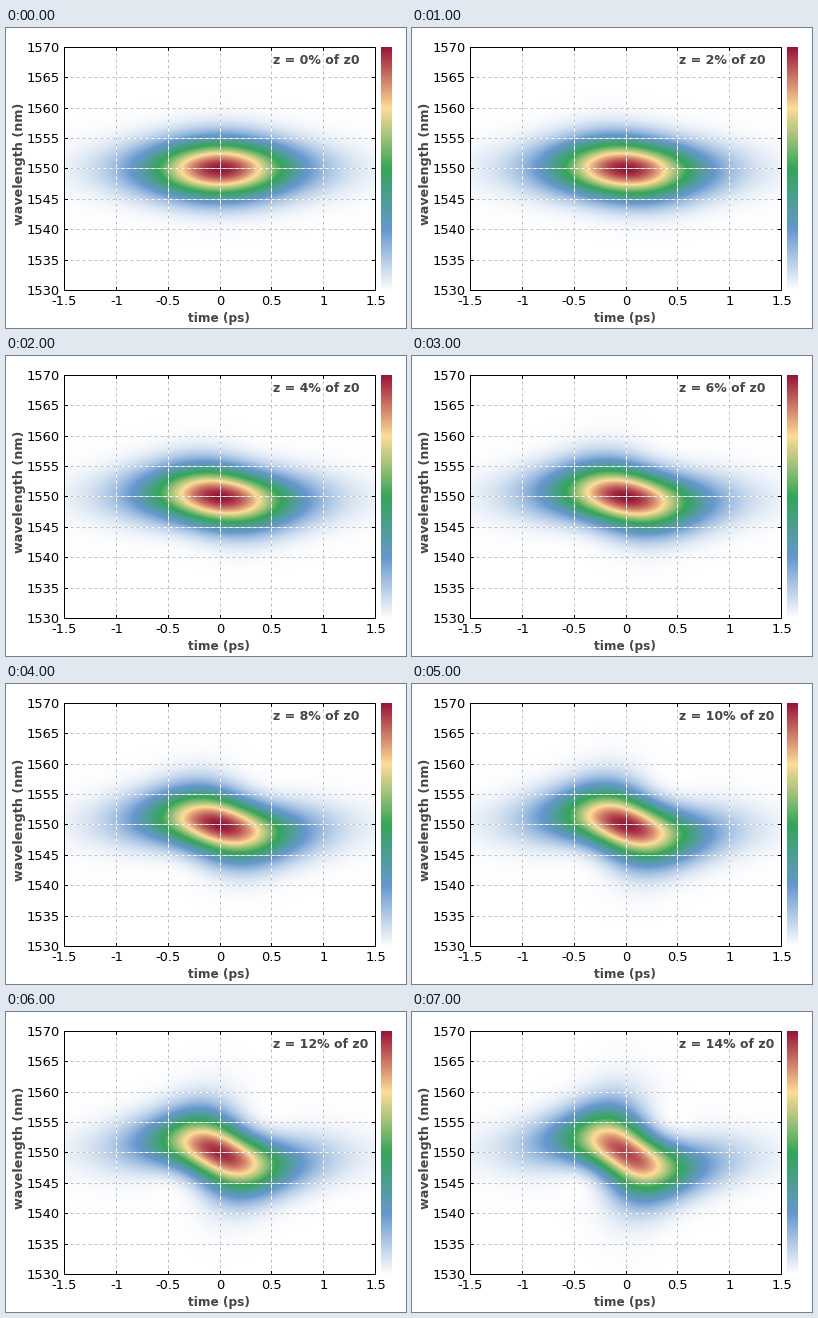
A matplotlib script for the animation above (8000 ms loop, 400 by 300 pixels).

```python
import numpy as np
import matplotlib.pyplot as plt
from matplotlib.animation import FuncAnimation
from matplotlib.colors import LinearSegmentedColormap

DPI = 100
PX = 72 / DPI                              # points per pixel
LEFT, RIGHT, TOP, BOTTOM = 58, 369, 19, 262
FRAMES, INTERVAL = 8, 1000
STEP = 0.02                                # distance per frame, in z0
GREY = "#464646"

ORDER = 3                                  # soliton order
T0 = 1 / 1.763                             # sech width of a 1 ps pulse
GATE = 2 * np.log(2) / 0.5 ** 2            # 0.5 ps Gaussian gate
LIGHT = 299792.458                         # nm THz

plt.rcParams["font.family"] = "DejaVu Sans"

cmap = LinearSegmentedColormap.from_list("spectrum", [
    "white", (0.40, 0.595, 0.81), (0.20, 0.65, 0.34),
    (1.0, 0.865, 0.59), (0.605, 0.08, 0.21)], N=1024)

t = np.linspace(-1.5, 1.5, RIGHT - LEFT + 1)
wavelength = np.linspace(1570, 1530, BOTTOM - TOP + 1)
omega = 2 * np.pi * LIGHT * (1 / wavelength - 1 / 1550)
s = np.linspace(-6, 6, 512, endpoint=False)
gate = np.exp(-GATE * (t[:, None] - s) ** 2)
fourier = np.exp(1j * np.outer(s, omega))
start = 1 / np.cosh(s / T0)
peak = (start * np.exp(-GATE * s ** 2)).sum() ** 2


def propagate(pulse, z, steps=40):
    """Split-step solution of the nonlinear Schroedinger equation."""
    dz = z * np.pi / 2 / steps
    freq = 2 * np.pi * np.fft.fftfreq(s.size, (s[1] - s[0]) / T0)
    dispersion = np.exp(-0.5j * freq ** 2 * dz)
    for _ in range(steps):
        pulse = pulse * np.exp(0.5j * ORDER ** 2 * abs(pulse) ** 2 * dz)
        pulse = np.fft.ifft(np.fft.fft(pulse) * dispersion)
        pulse = pulse * np.exp(0.5j * ORDER ** 2 * abs(pulse) ** 2 * dz)
    return pulse


def spectrogram(z):
    pulse = propagate(start, z)
    return (np.abs((gate * pulse) @ fourier) ** 2).T / peak


fig = plt.figure(figsize=(400 / DPI, 300 / DPI), dpi=DPI, facecolor="white")
ax = fig.add_axes([0, 0, 1, 1])
ax.set_axis_off()


def line(x, y, color="black", **style):
    ax.plot(np.add(x, 0.5), np.add(y, 0.5), color=color, lw=PX, snap=False,
            solid_capstyle="projecting", solid_joinstyle="miter",
            dash_capstyle="butt", **style)


def grid_line(x, y):
    """Grey dots whose gaps are filled with white."""
    line(x, y, "white", zorder=1)
    line(x, y, "#c0c0c0", linestyle=(0, (3, 3)), zorder=1.1)


def label(x, y, text, size=12.5, color=GREY, weight="bold", **style):
    return ax.text(x, y, text, fontsize=size * PX, color=color,
                   weight=weight, **style)


field = ax.imshow(spectrogram(0), cmap=cmap, vmin=0, vmax=1,
                  extent=(LEFT, RIGHT + 1, BOTTOM + 1, TOP),
                  interpolation="nearest", aspect="auto", zorder=0)
ax.imshow(np.linspace(1, 0, 244)[:, None], cmap=cmap, vmin=0, vmax=1,
          extent=(375, 386, BOTTOM + 1, TOP), interpolation="nearest",
          aspect="auto", zorder=0)

xticks = np.round(np.linspace(LEFT, RIGHT, 7))
yticks = np.round(np.linspace(TOP, BOTTOM, 9))
tick = dict(size=13, color="black", weight="normal")

for i, x in enumerate(xticks):
    if 0 < i < 6:
        grid_line([x, x], [BOTTOM, TOP])
        line([x, x], [TOP, TOP + 3])
        line([x, x], [BOTTOM - 3, BOTTOM])
    label(x + 0.5, 277, f"{-1.5 + 0.5 * i:g}", ha="center", **tick)

for i, y in enumerate(yticks):
    if 0 < i < 8:
        grid_line([LEFT, RIGHT], [y, y])
        line([LEFT, LEFT + 3], [y, y])
        line([RIGHT - 3, RIGHT], [y, y])
    label(54, y + 5, str(1570 - 5 * i), ha="right", **tick)

line([LEFT, RIGHT, RIGHT, LEFT, LEFT], [TOP, TOP, BOTTOM, BOTTOM, TOP], zorder=3)

label(212.5, 294, "time (ps)", 12.1, ha="center")
label(14, 135.5, "wavelength (nm)", 12.7, rotation=90, ha="center", va="center")
distance = label(267, 36, "")

ax.set_xlim(0, 400)
ax.set_ylim(300, 0)


def update(i):
    z = STEP * i
    field.set_data(spectrogram(z))
    distance.set_text(f"z = {100 * z:.0f}% of z0")
    return field, distance


anim = FuncAnimation(fig, update, frames=FRAMES, interval=INTERVAL,
                     repeat=True, repeat_delay=0)
plt.show()
```
